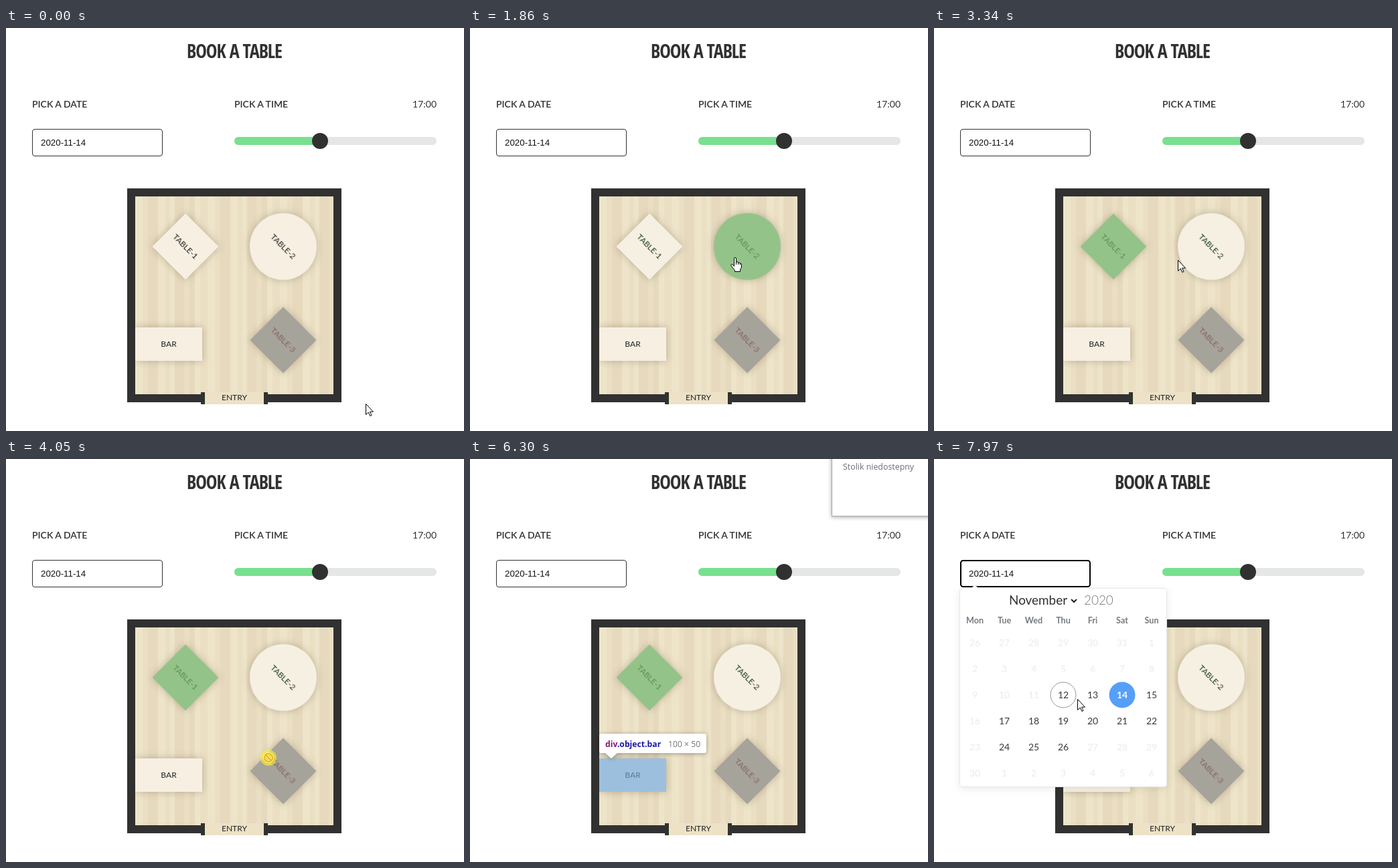
Animation of 684 by 603 pixels, one loop 8 s. Source, as an HTML page:

```html
<!DOCTYPE html>
<html lang="en">
<head>
<meta charset="utf-8">
<title>Book a table</title>
<style>
  html, body { margin: 0; width: 100%; height: 100%; overflow: hidden; background: #fff; }
  svg { display: block; width: 684px; height: 603px; font: 14px Lato, sans-serif; fill: #313131; }
  text { white-space: pre; }
  .title { font: 600 28px 'Open Sans Condensed', 'Roboto Condensed', 'Open Sans', sans-serif; font-stretch: 75%; letter-spacing: -1px; }
  .label { font-weight: 600; }
  .mid { text-anchor: middle; }
  .field { font: 13.33px 'Liberation Sans', Arial, sans-serif; fill: #111; }
  .object { font-size: 12px; font-weight: 500; text-anchor: middle; fill: #f7efe2; filter: drop-shadow(0 0 6px rgba(70, 55, 30, .3)); }
  .object text { fill: #313131; }
  .left { fill: #f6f0e3; }
  .left text { fill: #2f4a2a; }
  .chosen { fill: #94c389; }
  .chosen text { fill: #64905d; }
  .taken { fill: #a6a39a; }
  .taken text { fill: #84696a; }
  .ui { font: 12.4px 'Open Sans', sans-serif; }
  .tip { font-size: 12.2px; }
  .panel { fill: #fff; filter: drop-shadow(0 1px 3px rgba(0, 0, 0, .35)); }
  .weekday { font-size: 12.6px; font-weight: 700; fill: #757b82; text-anchor: middle; }
  .day { fill: #393939; text-anchor: middle; }
  .off { fill: rgba(57, 57, 57, .1); }
  .picked { fill: #fff; font-weight: 700; }
  .cursor { fill: #fff; stroke: #000; stroke-linejoin: round; }
</style>
</head>
<body>
<svg viewBox="0 0 684 603">
  <defs>
    <linearGradient id="floor" gradientUnits="userSpaceOnUse" x1="193" x2="301" y1="0" y2="0" spreadMethod="repeat"></linearGradient>
  </defs>

  <text class="title mid" x="341" y="45">BOOK A TABLE</text>
  <text class="label" x="39" y="119">PICK A DATE</text>
  <text class="label" x="341" y="119">PICK A TIME</text>
  <text x="643" y="119" text-anchor="end">17:00</text>

  <rect id="input" rx="3.5" fill="#fff"/>
  <text class="field" x="52" y="176">2020-11-14</text>

  <rect x="341" y="163" width="302" height="12" rx="6" fill="#e5e7e6"/>
  <rect x="341" y="163" width="134" height="12" rx="6" fill="#78e08f"/>
  <circle cx="469" cy="169" r="12"/>

  <rect x="187" y="246" width="308" height="308" fill="url(#floor)" stroke="#313131" stroke-width="12"/>
  <rect x="291" y="545" width="100" height="18"/>
  <rect x="297" y="545" width="88" height="18" fill="#ede2c6"/>
  <text class="mid" x="341" y="557" font-size="12" font-weight="500">ENTRY</text>

  <g id="table1" class="object" transform="translate(268 327) rotate(45)">
    <rect x="-35" y="-35" width="70" height="70"/><text y="4">TABLE-1</text>
  </g>
  <g id="table2" class="object" transform="translate(414 327) rotate(45)">
    <circle r="50"/><text y="4">TABLE-2</text>
  </g>
  <g class="object taken" transform="translate(414 467) rotate(45)">
    <rect x="-35" y="-35" width="70" height="70"/><text y="4">TABLE-3</text>
  </g>
  <g id="bar" class="object" transform="translate(243 473)">
    <rect x="-50" y="-25" width="100" height="50"/><text y="4">BAR</text>
  </g>

  <g id="inspect" class="ui tip">
    <rect x="193" y="448" width="100" height="50" fill="#6fa8dc" opacity=".66"/>
    <path class="panel" d="M196 411H350Q353 411 353 414V437Q353 440 350 440H220L211 448L202 440H196Q193 440 193 437V414Q193 411 196 411Z"/>
    <text x="202" y="431" font-weight="700" fill="#881280">div<tspan fill="#1a1aa6">.object.bar</tspan></text>
    <text x="296" y="431" fill="#757575">100 × 50</text>
  </g>

  <g id="alert" class="ui">
    <rect class="panel" x="540.5" y="-20" width="300" height="105.5" stroke="#a5a5a5"/>
    <text x="557" y="16" fill="#6b6a7b">Stolik niedostepny</text>
  </g>

  <g id="calendar">
    <path d="M38.5 198Q38.5 193.5 43 193.5H56L61 188.5L66 193.5H343Q347.5 193.5 347.5 198V486Q347.5 490.5 343 490.5H43Q38.5 490.5 38.5 486Z"
      fill="#fff" stroke="#e6e6e6" style="filter:drop-shadow(0 3px 6px rgba(0,0,0,.08))"/>
    <text x="112" y="218" font-size="18.9">November</text>
    <path d="M205 210L209 214L213 210" fill="none" stroke="#222" stroke-width="2"/>
    <text x="224" y="218" font-size="18.9" font-weight="300" fill="#777">2020</text>
    <circle cx="193" cy="353" r="19" fill="none" stroke="#959595"/>
    <circle cx="281" cy="353" r="19.5" fill="#569ff7"/>
  </g>

  <g id="ban" fill="none">
    <g stroke="#fff" stroke-width="4"><circle r="6"/><path d="M-4-4L4 4"/></g>
    <g stroke="#d8391c" stroke-width="2"><circle r="6"/><path d="M-4-4L4 4"/></g>
  </g>
  <circle id="click" r="12" fill="#fff628" opacity=".6"/>
  <path id="arrow" class="cursor" d="M.5 .5V16.5L4.3 13L6.8 18.5L9 17.5L6.6 12.2H11.5Z"/>
  <g id="hand" class="cursor">
    <path d="M1.5 13.5V2Q1.5 .5 3 .5T4.5 2V7Q7.5 6 7.5 8.3Q10 7.3 10.3 9.3Q12.5 8.8 12.5 11V15L10.5 19V21.5H2.5V19.5L-3 12.8Q-3.7 10.8-1.8 10.6Q0 11 1.5 13.5Z"/>
    <path d="M4.5 7V11M7.5 8V11M10.3 9V11.5" fill="none"/>
  </g>
</svg>
<script>
const LOOP = 8000;
const $ = id => document.getElementById(id);

function add(parent, tag, attrs, text = '') {
  const el = document.createElementNS('http://www.w3.org/2000/svg', tag);
  for (const key in attrs) el.setAttribute(key, attrs[key]);
  el.textContent = text;
  parent.append(el);
}

// Floor boards: right edge of each board and its shade
const shades = ['#eee4c9', '#eadfc3', '#e6d9bd'];
let edge = 0;
for (const [end, shade] of [[12, 0], [20, 1], [35, 2], [46, 0], [53, 1], [60, 0], [74, 2], [82, 1], [90, 2], [98, 0], [108, 1]]) {
  for (const at of [edge, end - 2]) add($('floor'), 'stop', { offset: at / 108, 'stop-color': shades[shade] });
  edge = end;
}

['Mon', 'Tue', 'Wed', 'Thu', 'Fri', 'Sat', 'Sun'].forEach((name, i) =>
  add($('calendar'), 'text', { class: 'weekday', x: 61 + 44 * i, y: 246 }, name));
for (let i = 0; i < 42; i++) {
  const open = i >= 17 && i <= 31 && i % 7;
  add($('calendar'), 'text', {
    class: 'day' + (i === 19 ? ' picked' : open ? '' : ' off'),
    x: 61 + 44 * (i % 7),
    y: 280 + 39 * Math.floor(i / 7)
  }, new Date(2020, 9, 26 + i).getDate());
}

// Pointer moves: first step, last step, number of steps, points to pass
const moves = [
  [70, 450, 6, [262, 356], [252, 367]],
  [600, 750, 3, [269, 368]],
  [1170, 1550, 6, [404, 352], [393, 343]],
  [2090, 2470, 6, [271, 360]],
  [2640, 2640, 1, [271, 361]],
  [3030, 3800, 11, [442, 335], [409, 306]],
  [3880, 3880, 1, [392, 447]],
  [4130, 4580, 7, [630, 8]],
  [5040, 5270, 4, [609, 2]],
  [5420, 5650, 4, [651, 8]],
  [6370, 6370, 1, [660, 100]],
  [6450, 6740, 5, [130, 172]],
  [7500, 7970, 7, [214, 359]]
];
const clicks = [[920, 990], [1780, 1860], [2710, 2880], [4050, 4130], [7200, 7280]];
const fade = [[7200, .24, -15], [7280, .86, -3], [7350, .97, -1], [7430, 1, 0]];

const within = (t, a, b) => t >= a && t < b;
const smooth = p => p * p * (3 - 2 * p);
const dist = (a, b) => Math.hypot(b[0] - a[0], b[1] - a[1]);

function along(path, p) {
  let rest = p * path.slice(1).reduce((sum, pt, i) => sum + dist(path[i], pt), 0);
  for (let i = 1; i < path.length; i++) {
    const [a, b] = [path[i - 1], path[i]];
    const len = dist(a, b);
    if (rest <= len) return a.map((v, k) => Math.round(v + (b[k] - v) * rest / (len || 1)));
    rest -= len;
  }
  return path[path.length - 1];
}

function pointer(t) {
  let pos = [537, 562];
  for (const [start, end, steps, ...points] of moves) {
    if (t < start) break;
    const gap = (end - start) / (steps - 1) || 1;
    const step = Math.min(steps, Math.floor((t - start) / gap + 1e-6) + 1);
    pos = along([pos, ...points], smooth(step / steps));
  }
  return pos;
}

function cursorAt(t, x, y) {
  if (within(t, 6300, 6370)) return '';
  if (within(x, 39, 234) && within(y, 151, 192)) return 'hand';
  if (within(t, 4130, 6370) || t >= 7200) return 'arrow';
  const diamond = (cx, cy) => Math.abs(x - cx) + Math.abs(y - cy) < 49.5;
  if (diamond(414, 467)) return 'ban';
  return diamond(268, 327) || dist([x, y], [414, 327]) < 50 ? 'hand' : 'arrow';
}

function show(id, on) { $(id).style.display = on ? '' : 'none'; }
function set(id, attrs) { for (const key in attrs) $(id).setAttribute(key, attrs[key]); }

function draw(t) {
  const [x, y] = pointer(t);
  const cursor = cursorAt(t, x, y);
  for (const id of ['arrow', 'hand', 'ban', 'click']) {
    show(id, id === 'click' ? clicks.some(c => within(t, ...c)) : id === cursor);
    set(id, { transform: `translate(${x} ${y})` });
  }

  const second = within(t, 1860, 2880);
  set('table1', { class: 'object ' + (second ? 'left' : t >= 990 ? 'chosen' : '') });
  set('table2', { class: 'object ' + (second ? 'chosen' : t >= 2880 ? 'left' : '') });
  set('bar', { class: 'object ' + (t >= 6370 ? 'left' : '') });

  show('alert', within(t, 4130, 6370));
  show('inspect', within(t, 6300, 6370));

  const focus = t >= 7200;
  set('input', focus
    ? { x: 40, y: 152, width: 193, height: 39, stroke: '#000', 'stroke-width': 2 }
    : { x: 39.5, y: 151.5, width: 194, height: 40, stroke: '#313131', 'stroke-width': 1 });
  show('calendar', focus);
  if (focus) {
    const [, opacity, dy] = fade.filter(f => t >= f[0]).pop();
    set('calendar', { opacity, transform: `translate(0 ${dy})` });
  }
}

function tick() {
  draw(performance.now() % LOOP);
  requestAnimationFrame(tick);
}
tick();
</script>
</body>
</html>
```
